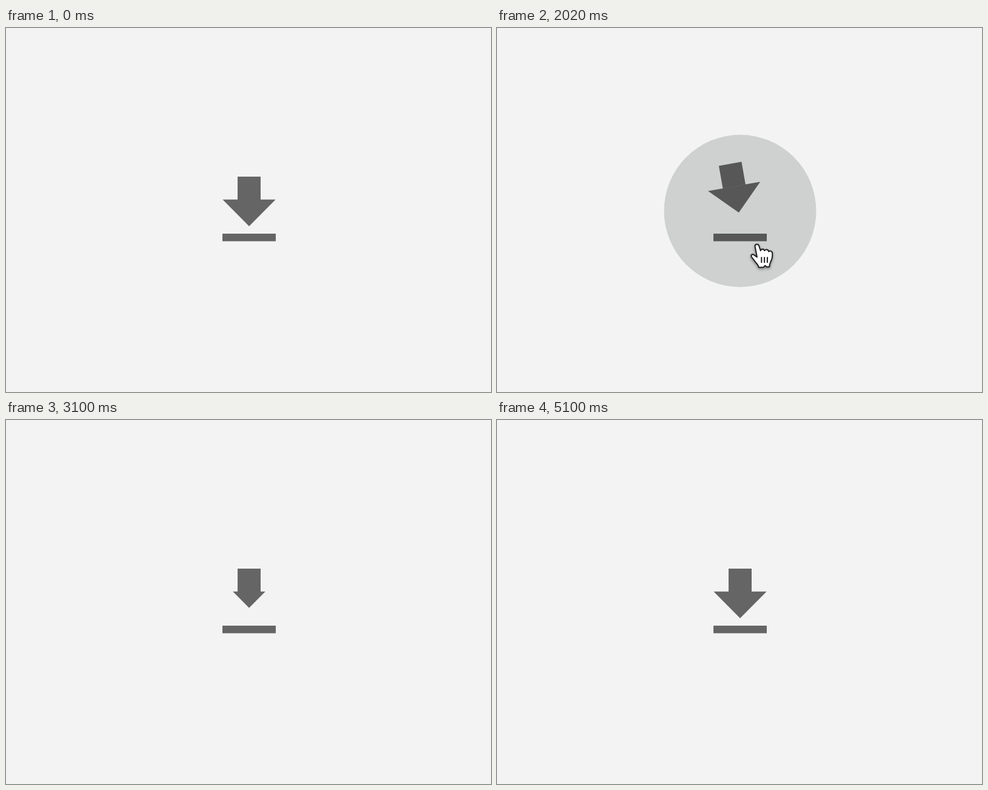
Recreate the animation shown at these times as an HTML page. Size 800x600 px, loop 6.1 s.

```html
<!DOCTYPE html>
<html lang="en">
<head>
<meta charset="utf-8">
<title>Download button</title>
<style>
html, body { margin: 0; width: 100%; height: 100%; overflow: hidden; background: #f3f3f3; }
svg { display: block; width: 100%; height: 100%; }
.line { fill: none; stroke: #000; stroke-width: 12.5; }
.shade { filter: drop-shadow(0 2px 2px rgba(0, 0, 0, .4)); }
</style>
</head>
<body>
<svg viewBox="0 0 800 600">
  <circle id="disc" cx="401" cy="301.5" r="125.5"/>
  <g opacity=".58">
    <g id="arrow">
      <rect id="shaft" x="382" width="38"/>
      <path id="head" d="M-43.7 0H43.7L0 44Z"/>
    </g>
    <path id="check" class="line" pathLength="1" d="M361.5 290.5L389 317.8L444 262.8"/>
    <path id="bar" class="line"/>
  </g>
  <g id="cursor">
    <path id="pointer" class="shade" d="M0 0V28.5L6.5 22.5L11.5 35L17 32.5L12 20.5L20.5 20Z"
      stroke="#fff" stroke-width="5" paint-order="stroke"/>
    <g id="hand" class="shade" transform="translate(-417 -345)">
      <path fill="#fff" stroke="#222" stroke-width="2" stroke-linejoin="round"
        d="M414 346.5C413.4 341.8 419.4 341 420.6 345.4L423.2 353C424 349.5 429 349.8 429.6 353
        C431 350 436 350.6 436.4 354.4C438.5 352.4 442.6 353.6 442.6 357.6C443 363 441.6 368 439.6 371.5
        C438.4 374 438 376 437.6 379.6H433L430.5 377.5L428 380.4H420C420 377 417 374.5 414.5 371.5
        C412 368 410 365.5 408 363C406.6 360 409.6 357.8 412.4 360L417.3 363.5Z"/>
      <path fill="none" stroke="#222" stroke-width="2" d="M424.7 363.5V373M429.5 363.5V373M434.3 363.5V373"/>
    </g>
  </g>
</svg>
<script>
const LOOP = 6100;
const el = {};
document.querySelectorAll('[id]').forEach(node => el[node.id] = node);

const set = (node, name, value) => node.setAttribute(name, value);
const show = (node, on) => set(node, 'visibility', on ? 'inherit' : 'hidden');
const mix = (a, b, p) => a + (b - a) * p;
const span = (t, from, to) => Math.min(1, Math.max(0, (t - from) / (to - from)));
const inOut = p => p < .5 ? 4 * p ** 3 : 1 - 4 * (1 - p) ** 3;
const out = p => 1 - (1 - p) ** 3;
const backOut = p => 1 + 1.9 * (p - 1) ** 3 + .9 * (p - 1) ** 2;

function drawCursor(t) {
  const leaving = t >= 1860;
  const p = inOut(leaving ? span(t, 1860, 2430) : span(t, 1120, 1600));
  const x = leaving ? mix(417, 546, p) : mix(507, 417, p);
  const y = leaving ? mix(345, 501, p) : mix(470, 345, p);
  const over = Math.hypot(x - 401, y - 301.5) < 125.5;
  set(el.cursor, 'transform', `translate(${x} ${y})`);
  set(el.cursor, 'opacity', leaving ? 1 - span(t, 2270, 2430) : span(t, 1020, 1410));
  show(el.hand, over);
  show(el.pointer, !over);
}

function drawDisc(t) {
  const p = span(t, 1860, 1960);
  show(el.disc, t >= 1760 && t < 2300);
  set(el.disc, 'fill', `rgb(${mix(224, 206, p)}, ${mix(224, 209, p)}, ${mix(224, 207, p)})`);
}

const ring = t => {
  const s = Math.max(0, t - 2370);
  return 24 * Math.exp(-.0055 * s) * Math.sin(s * 2 * Math.PI / 240);
};

// Hop, hit the bar, sink with it and recover.
function arrowDrop(t) {
  const hop = span(t, 1860, 2330);
  if (hop < 1) return -100 * hop * (1 - hop);
  if (t < 2370) return 12 * span(t, 2330, 2370);
  if (t < 2430) return 12 + ring(t);
  return (12 + ring(2430)) * (1 - span(t, 2430, 2930)) ** 3;
}

function drawBounce(t) {
  const drop = arrowDrop(t);
  const tilt = -12 * Math.sin(2 * Math.PI * span(t, 1860, 2330));
  set(el.arrow, 'transform', `translate(0 ${drop}) rotate(${tilt} 401 339)`);
  let sag = t < 2980 ? ring(t) : 0;
  if (t > 2430 && t < 2930) sag = Math.max(sag, drop - 12);
  set(el.bar, 'd', `M357 345.25Q401 ${345.25 + 2 * sag} 445 345.25`);
}

function drawMorph(t) {
  const back = t >= 4120;
  const head = back ? out(span(t, 4740, 5100)) : 1 - inOut(span(t, 3000, 3220));
  const shaft = back ? backOut(span(t, 4380, 4700)) : 1 - inOut(span(t, 3100, 3320));
  const check = back ? 1 - inOut(span(t, 4120, 4440)) : out(span(t, 3240, 3740));
  set(el.head, 'transform', `translate(401 282.7) scale(${head})`);
  set(el.shaft, 'y', 283 - 38 * shaft);
  set(el.shaft, 'height', Math.max(0, 38 * shaft));
  show(el.head, head > 0);
  show(el.check, check > 0);
  set(el.check, 'stroke-dasharray', `${check} 2`);
}

function render(t) {
  drawDisc(t);
  drawBounce(t);
  drawMorph(t);
  drawCursor(t);
}

const start = performance.now();
function tick() {
  render((performance.now() - start) % LOOP);
  requestAnimationFrame(tick);
}
tick();
</script>
</body>
</html>
```
